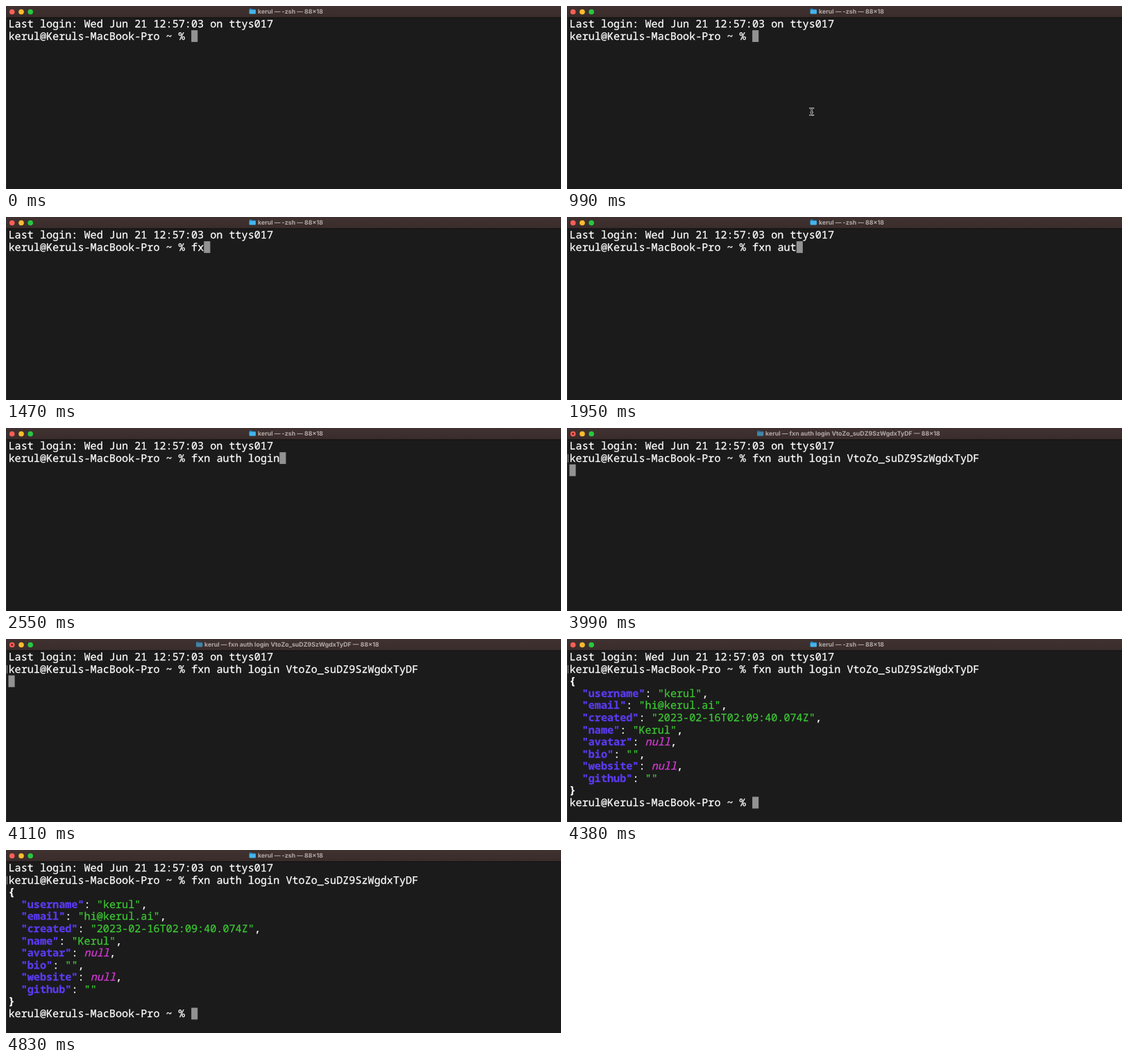
Animation of 800 by 265 pixels, one loop 4.86 s. Source, as an HTML page:

```html
<!DOCTYPE html>
<html lang="en">
<head>
<meta charset="utf-8">
<title>Terminal login</title>
<style>
  html, body { margin: 0; width: 100%; height: 100%; overflow: hidden; background: #1b1b1b; }
  svg { display: block; width: 800px; height: 265px; }
  text { white-space: pre; text-rendering: geometricPrecision; }
  .row { font: 500 15.15px "Noto Sans Mono", monospace; color: #fff; }
  .row tspan { fill: currentColor; stroke: currentColor; stroke-width: .25px; }
  .title { font: 700 8.8px Inter, sans-serif; fill: #b3aaa8; }
  .key { font-weight: 700; color: #5b3bf0; }
  .str { color: #3dc934; }
  .null { font-style: italic; color: #d63ad6; }
  .brace { font-weight: 700; }
  .selected { color: #111; }
</style>
</head>
<body>
<svg viewBox="0 0 800 265">
  <defs>
    <linearGradient id="bar" x2="0" y2="1">
      <stop offset="0" stop-color="#3f3230"/>
      <stop offset="1" stop-color="#392c2a"/>
    </linearGradient>
    <path id="beamShape" d="M-2.5-5Q0-5 0-3Q0-5 2.5-5M0-3V3M-2.5 5Q0 5 0 3Q0 5 2.5 5M-1.2 1H1.2"/>
  </defs>
  <rect width="800" height="265" fill="#1b1b1b"/>
  <rect width="800" height="16.5" fill="url(#bar)"/>
  <rect y="16.5" width="800" height="1" fill="#131111"/>
  <rect width=".8" height="265" fill="#303030"/>
  <circle cx="8.7" cy="8.5" r="3.8" fill="#fe5f57"/>
  <circle id="busyDot" cx="8.7" cy="8.5" r="1.4" fill="#7d1712"/>
  <circle cx="22" cy="8.5" r="3.8" fill="#febc2e"/>
  <circle cx="35.2" cy="8.5" r="3.8" fill="#28c840"/>
  <g id="folder">
    <path d="M0 1.2Q0 .3 .9 .3H3.3L4.4 1.4H8.3Q9.2 1.4 9.2 2.3V7.5H0Z" fill="#2387c4"/>
    <rect y="2.4" width="9.2" height="5.6" rx=".8" fill="#45b4ec"/>
  </g>
  <text id="title" class="title" y="11.4"></text>
  <rect id="mark" x="1" y="38" width="1" height="12" fill="#8b8b8b"/>
  <rect id="cursor" width="9.1" height="17" fill="#929292"/>
  <rect id="selection" y="35.1" height="17" fill="#fff"/>
  <g id="screen"></g>
  <g id="beam" fill="none" stroke-linecap="round">
    <use href="#beamShape" stroke="#e4e4e4" stroke-width="2.2"/>
    <use href="#beamShape" stroke="#151515" stroke-width=".9"/>
  </g>
</svg>
<script>
const LOOP = 4860, CELL = 9.09, LINE = 17.58, LEFT = 3.5, TOP = 17.5;
const USER = 'kerul';
const PROMPT = 'kerul@Keruls-MacBook-Pro ~ % ';
const COMMAND = 'fxn auth login ';
const TOKEN = 'VtoZo_suDZ9SzWgdxTyDF';
const KEYS = [1380, 1470, 1560, 1650, 1740, 1830, 1920, 2010,
              2100, 2190, 2280, 2370, 2460, 2550, 2790];
const BEAM_IN = 660, BEAM_STOP = 930, PASTE = 2940, ENTER = 3540, DONE = 4200;

const $ = id => document.getElementById(id);
const set = (el, attrs) => { for (const k in attrs) el.setAttribute(k, attrs[k]); };
const show = (el, on) => el.setAttribute('visibility', on ? 'visible' : 'hidden');
const colX = col => LEFT + col * CELL;
const rowY = row => TOP + row * LINE;

// Each run is [text, class]; runs follow one another on the cell grid.
function addRow(row, runs, startCol = 0) {
  const line = document.createElementNS('http://www.w3.org/2000/svg', 'text');
  set(line, { class: 'row', y: rowY(row) + 13.6 });
  let col = startCol;
  for (const [str, cls] of runs) {
    const span = document.createElementNS('http://www.w3.org/2000/svg', 'tspan');
    set(span, { x: colX(col), class: cls || '' });
    span.textContent = str;
    line.append(span);
    col += str.length;
  }
  $('screen').append(line);
  return line;
}

const argCol = PROMPT.length + COMMAND.length;
const endCol = argCol + TOKEN.length;
addRow(0, [['Last login: Wed Jun 21 12:57:03 on ttys017']]);
addRow(1, [[PROMPT]]);
const typed = addRow(1, [['']], PROMPT.length).firstChild;
const token = addRow(1, [[TOKEN]], argCol).firstChild;
set($('selection'), { x: colX(argCol), width: TOKEN.length * CELL });

const profile = {
  username: USER, email: 'hi@kerul.ai', created: '2023-02-16T02:09:40.074Z',
  name: 'Kerul', avatar: null, bio: '', website: null, github: ''
};
const fields = Object.entries(profile);
const output = [
  addRow(2, [['{', 'brace']]),
  ...fields.map(([key, value], i) => addRow(3 + i, [
    ['  '], [`"${key}"`, 'key'], [': '],
    value === null ? ['null', 'null'] : [`"${value}"`, 'str'],
    [i < fields.length - 1 ? ',' : '']
  ])),
  addRow(11, [['}', 'brace']]),
  addRow(12, [[PROMPT]])
];

function render(t) {
  const count = KEYS.filter(k => t >= k).length;
  const pasted = t >= PASTE, entered = t >= ENTER, done = t >= DONE;
  const busy = entered && !done;

  typed.textContent = COMMAND.slice(0, count);
  show(token, pasted);
  set(token, { class: entered ? '' : 'selected' });
  show($('selection'), pasted && !entered);
  show($('mark'), entered);
  output.forEach(line => show(line, done));

  const [row, col] = done ? [12, PROMPT.length]
    : entered ? [2, 0]
    : [1, pasted ? endCol : PROMPT.length + count];
  set($('cursor'), { x: colX(col), y: rowY(row) });

  show($('busyDot'), busy);
  const job = busy ? COMMAND + TOKEN : '-zsh';
  $('title').textContent = `${USER} — ${job} — 88×18`;
  set($('title'), { x: busy ? 286 : 363 });
  set($('folder'), {
    transform: `translate(${busy ? 274 : 350.7} 3.4)`,
    opacity: busy ? 0.65 : 1
  });

  const p = Math.min(1, Math.max(0, (t - BEAM_IN) / (BEAM_STOP - BEAM_IN)));
  const rest = (1 - p) ** 2;
  show($('beam'), t >= BEAM_IN && t < KEYS[0]);
  set($('beam'), { transform: `translate(${352.7 + 8 * rest} ${153 + 66 * rest})` });
}

const start = performance.now();
function tick() {
  render((performance.now() - start) % LOOP);
  requestAnimationFrame(tick);
}
tick();
</script>
</body>
</html>
```
